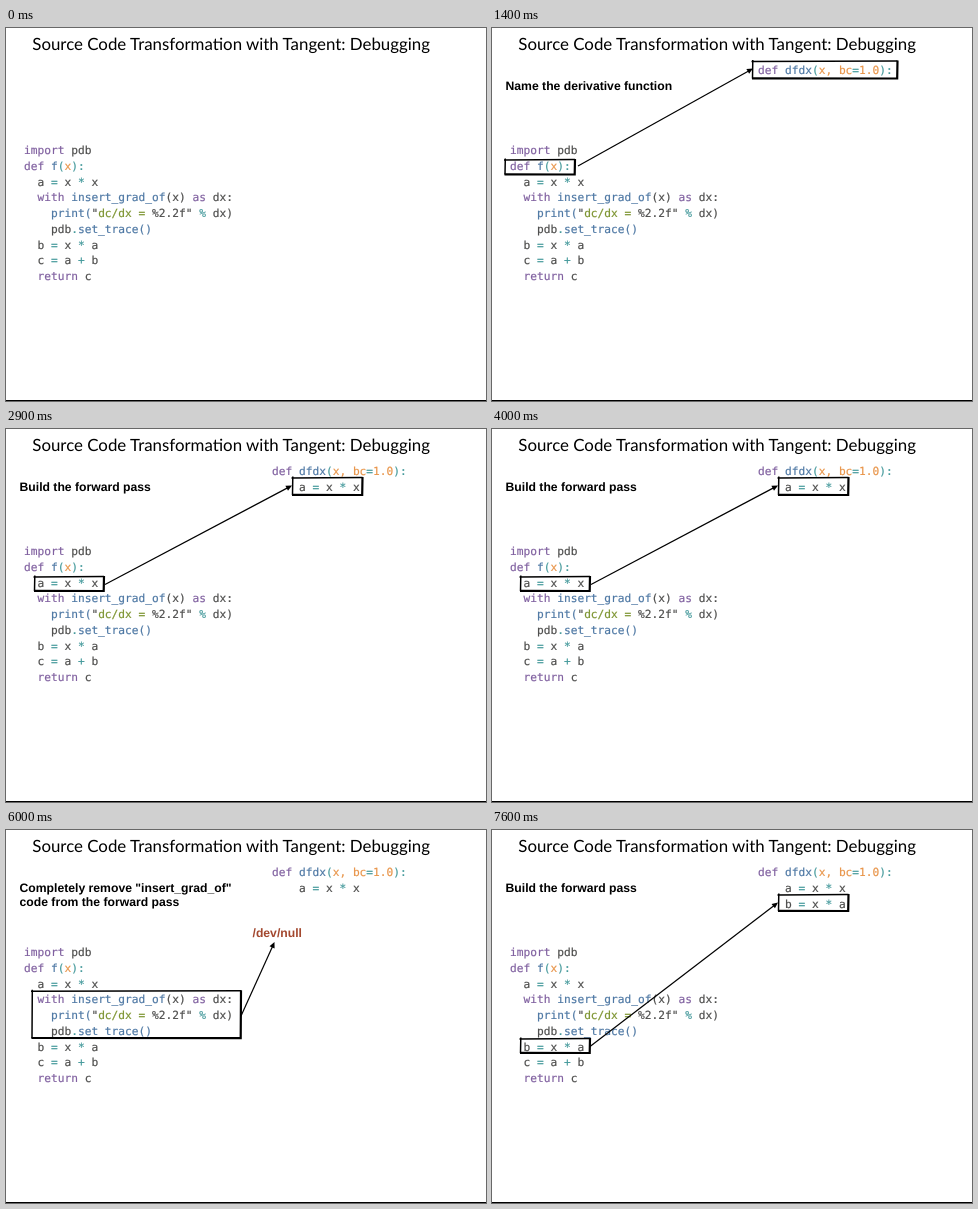
An HTML page for the animation above (8 s loop, 480 by 373 pixels).

```html
<!DOCTYPE html>
<html lang="en">
<head>
<meta charset="utf-8">
<title>Source Code Transformation</title>
<style>
  html, body { margin: 0; width: 100%; height: 100%; overflow: hidden; background: #fff; }
  svg { display: block; width: 480px; height: 373px; }
  text { white-space: pre; text-rendering: geometricPrecision; font-variant-ligatures: none; }
  .title { font: 16.87px Lato, sans-serif; fill: #000; }
  .code { font: 11.2px "DejaVu Sans Mono", monospace; color: #4d4d4c; }
  .code tspan { fill: currentColor; stroke: currentColor; stroke-width: .2px; }
  .note { font: bold 12.2px "Liberation Sans", Arial, sans-serif; fill: #000; }
  .k { color: #8061a0; }
  .f { color: #4e78a4; }
  .o { color: #469a9c; }
  .p { color: #e8954a; }
  .s { color: #7d9430; }
  .null { fill: #a3482f; }
</style>
</head>
<body>
<svg id="stage" viewBox="0 0 480 373"></svg>
<script>
const LOOP = 8000;
const stage = document.getElementById('stage');

function add(parent, tag, attrs, content) {
  const el = document.createElementNS('http://www.w3.org/2000/svg', tag);
  for (const name in attrs) el.setAttribute(name, attrs[name]);
  if (content) el.textContent = content;
  parent.append(el);
  return el;
}

// A line is a string of tokens; "k~def" colours "def" with class k.
function code(parent, x, y, line) {
  const text = add(parent, 'text', { x, y, class: 'code' });
  for (const token of line.split('|')) {
    const [, kind, str] = token.match(/^(?:(\w)~)?(.*)$/);
    add(text, 'tspan', kind ? { class: kind } : {}, str);
  }
}

function note(parent, x, y, str, kind = '') {
  add(parent, 'text', { x, y, class: 'note ' + kind }, str);
}

// Rough pen frame: light top and left, heavy right and bottom, overshooting corners.
function box(parent, x1, y1, x2, y2) {
  const pen = { fill: 'none', stroke: '#000' };
  add(parent, 'path', { ...pen, 'stroke-width': 1.5,
    d: `M${x1} ${y2}L${x1 + .3} ${y1 - 1}M${x1 - 1} ${y1 + .5}L${x2} ${y1}` });
  add(parent, 'path', { ...pen, 'stroke-width': 2.2,
    d: `M${x2} ${y1 - .5}L${x2 - .3} ${y2}L${x1 - .5} ${y2 - .2}` });
}

function arrow(parent, x1, y1, x2, y2) {
  const deg = Math.atan2(y2 - y1, x2 - x1) * 180 / Math.PI;
  const len = Math.hypot(x2 - x1, y2 - y1);
  const g = add(parent, 'g', { transform: `translate(${x1} ${y1}) rotate(${deg})` });
  add(g, 'path', { d: `M0 0H${len - 4}`, stroke: '#000', 'stroke-width': 1.2 });
  add(g, 'path', { d: `M${len} 0l-6 -2.8v5.6z` });
}

const PITCH = 15.77;
const rowLeft = i => 126.1 + i * PITCH;
const rowRight = i => 46 + i * PITCH;

add(stage, 'rect', { width: 480, height: 373, fill: '#fff' });
add(stage, 'rect', { y: 372, width: 480, height: 1 });
add(stage, 'text', { x: 26.3, y: 21.8, class: 'title' },
  'Source Code Transformation with Tangent: Debugging');

[
  'k~import| pdb',
  'k~def| |f~f|o~(|p~x|o~):',
  '  a |o~=| x |o~*| x',
  '  |k~with| |f~insert_grad_of|(x) |k~as| dx:',
  '    |f~print(|"|s~dc/dx = |%2.2f" |o~%| dx)',
  '    pdb|o~.|f~set_trace()',
  '  b |o~=| x |o~*| a',
  '  c |o~=| a |o~+| b',
  '  |k~return| c'
].forEach((line, i) => code(stage, 18, rowLeft(i), line));

// Parts that are visible from one time until another.
const parts = [];
function part(from, to, draw) {
  const g = add(stage, 'g', { visibility: 'hidden' });
  draw(g);
  parts.push({ g, from, to });
}

part(1300, LOOP, g => code(g, 266, rowRight(0), 'k~def| |f~dfdx|o~(|p~x, bc|o~=|p~1.0|o~):'));
part(2700, LOOP, g => code(g, 266, rowRight(1), '    a |o~=| x |o~*| x'));
part(7500, LOOP, g => code(g, 266, rowRight(2), '    b |o~=| x |o~*| a'));

part(1300, 2700, g => {
  note(g, 13.5, 61.7, 'Name the derivative function');
  box(g, 13, 131.5, 83, 146.5);
  box(g, 260.5, 33, 405.5, 50.5);
  arrow(g, 86, 138, 261, 40.5);
});
part(2700, 4200, g => {
  note(g, 13.5, 61.7, 'Build the forward pass');
  box(g, 28.5, 147.5, 98, 162);
  box(g, 286.5, 48.5, 356.5, 66);
  arrow(g, 99, 155.5, 286, 56.5);
});
part(4200, 7500, g => {
  note(g, 13.5, 61.7, 'Completely remove "insert_grad_of"');
  note(g, 13.5, 76, 'code from the forward pass');
  note(g, 246.5, 107, '/dev/null', 'null');
  box(g, 26, 160.7, 235, 208.2);
  arrow(g, 235, 186, 268.5, 112);
});
part(7500, LOOP, g => {
  note(g, 13.5, 61.7, 'Build the forward pass');
  box(g, 28.5, 208.5, 98, 223);
  box(g, 286.5, 64.5, 356.5, 81);
  arrow(g, 98, 216.5, 286, 72.5);
});

const start = performance.now();
function frame() {
  const t = (performance.now() - start) % LOOP;
  for (const { g, from, to } of parts) {
    g.setAttribute('visibility', t >= from && t < to ? 'visible' : 'hidden');
  }
  requestAnimationFrame(frame);
}
frame();
</script>
</body>
</html>
```
